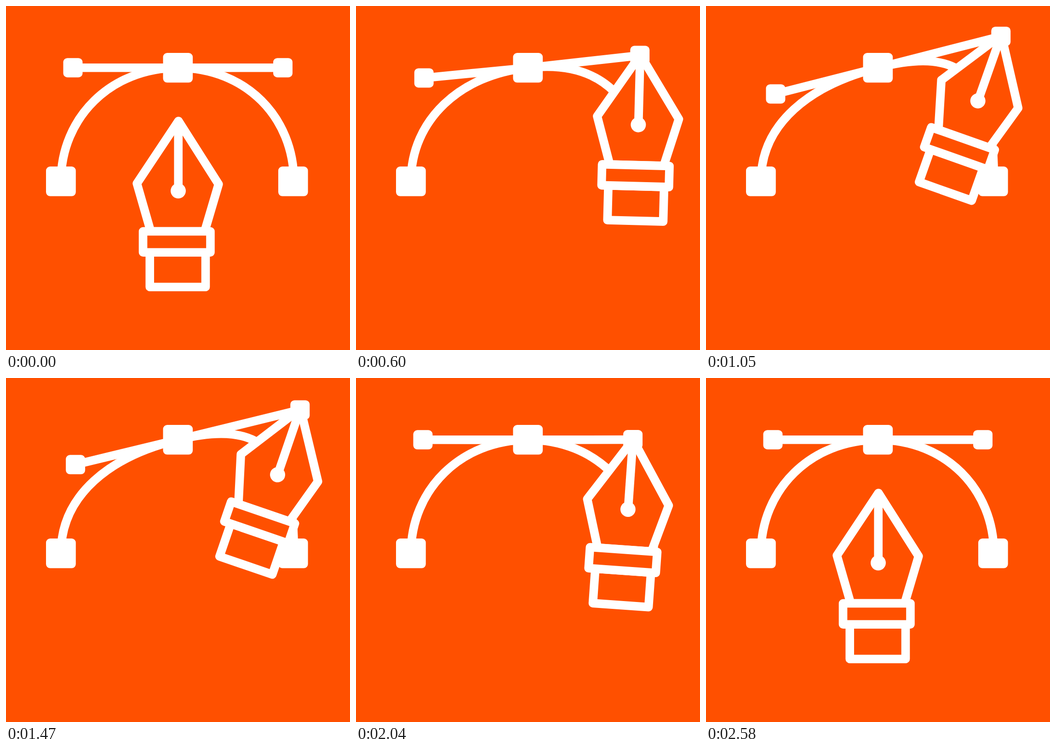
Animation of 748x748 px, one loop 5.61 s. Source, as an HTML page:

```html
<!DOCTYPE html>
<html lang="en">
<head>
<meta charset="utf-8">
<title>Pen tool</title>
<style>
  html, body { margin: 0; width: 100%; height: 100%; overflow: hidden; background: #ff5000; }
  svg { display: block; width: 100%; height: 100%; }
  .line { fill: none; stroke: #fff; stroke-width: 18.6; stroke-linejoin: round; }
  .body { fill: #ff5000; }
  .solid { fill: #fff; }
</style>
</head>
<body>
<svg viewBox="0 0 748 748">
  <path id="bar" class="line"/>
  <path id="curve" class="line"/>
  <g class="solid">
    <rect x="341.5" y="102" width="64.6" height="64.6" rx="9"/>
    <rect x="87" y="349" width="64.8" height="64.6" rx="9"/>
    <rect x="592" y="349" width="64.6" height="64.6" rx="9"/>
    <rect id="left" x="-21" y="-21" width="42" height="42" rx="9"/>
    <rect id="right" x="-21" y="-21" width="42" height="42" rx="9"/>
  </g>
  <!-- the pen's origin is its tip -->
  <g id="pen">
    <path class="line body" d="M-62.3 285.7H59V361H-62.3Z"/>
    <path class="line body" d="M0 0L87.3 137.5L57 240H-60.4L-90.4 135.8Z"/>
    <path class="line body" d="M-77 240H69.5V285.7H-77Z"/>
    <path class="line" d="M-.3 0V152"/>
    <circle class="solid" cx="-.5" cy="152" r="16.5"/>
  </g>
</svg>
<script>
  const LOOP = 5610, STEP = 30;
  const REST = [375, 250], OVER = [364, 260];
  const $ = id => document.getElementById(id);
  const clamp = u => Math.min(1, Math.max(0, u));
  const mix = (a, b, u) => a + (b - a) * u;
  const mixPt = (a, b, u) => [mix(a[0], b[0], u), mix(a[1], b[1], u)];
  const shift = (pt, dx, dy, u) => [pt[0] + dx * u, pt[1] + dy * u];
  const sine = u => (1 - Math.cos(Math.PI * clamp(u))) / 2;

  // cubic-bezier(.4, 0, .2, 1), solved by bisection
  function swift(u) {
    u = clamp(u);
    let lo = 0, hi = 1;
    for (let i = 0; i < 24; i++) {
      const s = (lo + hi) / 2, r = 1 - s;
      if (1.2 * r * r * s + 0.6 * r * s * s + s * s * s < u) lo = s; else hi = s;
    }
    return lo * lo * (3 - 2 * lo);
  }

  function place(el, pt, angle = 0) {
    el.setAttribute("transform", `translate(${pt}) rotate(${angle})`);
  }

  function draw(t) {
    const rising = t < 1200;
    const pull = rising ? swift((t - 336) / 864) : swift((2067 - t) / 867);

    const left = shift([145.5, 134.2], 6, 58, pull);
    const right = shift([602, 134.2], 40, -69.5, pull);
    place($("left"), left);
    place($("right"), right);
    $("bar").setAttribute("d", `M${left}L374 134.4L${right}`);

    const leftArm = shift([228, 134.4], -1, 38, pull);
    const rightArm = shift([522, 134.4], 42, -50, pull);
    $("curve").setAttribute("d",
      `M119.5 381C119.5 ${243 + 12 * pull} ${leftArm} 374 134.4` +
      `C${rightArm} 626 ${243 - 87 * pull} 626 381`);

    const grip = shift([603, 133.8], 40, -72, pull);
    let tip, angle;
    if (rising) {
      const reach = sine(t / 348);
      tip = mixPt(REST, grip, reach);
      angle = -10 * reach + 30 * pull;
    } else {
      const back = sine((t - 2028) / 390);
      const settle = sine((t - 2418) / 162);
      tip = mixPt(mixPt(grip, OVER, back), REST, settle);
      angle = mix(mix(4 + 16 * pull, -0.4, back), 0, settle);
    }
    place($("pen"), tip, angle);
  }

  const start = performance.now();
  function tick(now) {
    const t = Math.max(0, now - start) % LOOP;
    draw(Math.floor(t / STEP) * STEP);
    requestAnimationFrame(tick);
  }
  draw(0);
  requestAnimationFrame(tick);
</script>
</body>
</html>
```
